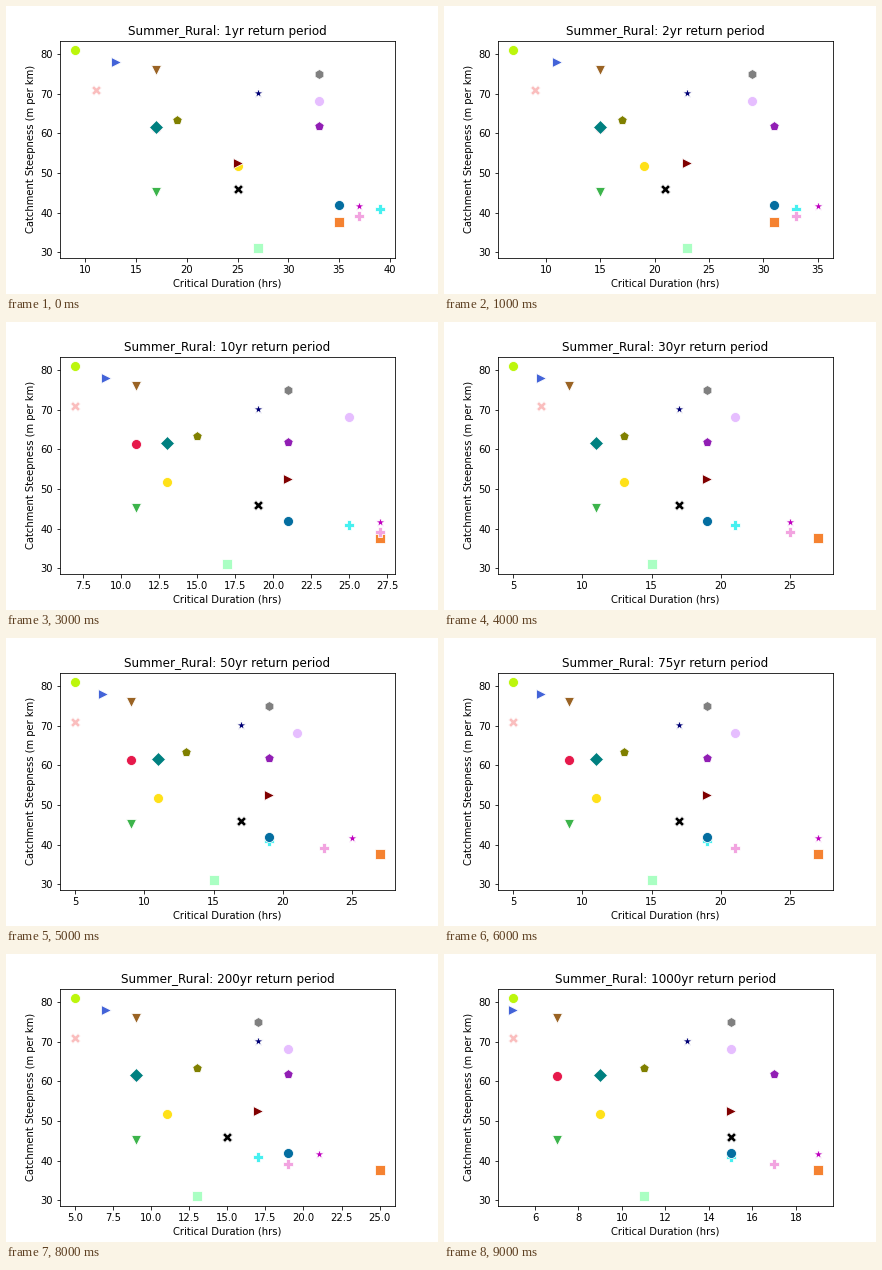
Animation, 432 px wide and 288 px high, one loop 10000 ms. Source, as a matplotlib script:

```python
import matplotlib.pyplot as plt
from matplotlib.animation import FuncAnimation

plt.rcParams["font.family"] = "DejaVu Sans"

# name: (colour, marker, steepness, duration for the 1yr period), in drawing order
SITES = {
    "crimson": ("#e6194b", "o", 61.3, 17),
    "green": ("#3cb44b", "v", 45.2, 17),
    "yellow": ("#ffe119", "o", 51.8, 25),
    "blue": ("#4363d8", ">", 77.9, 13),
    "orange": ("#f58231", "s", 37.6, 35),
    "purple": ("#911eb4", "p", 61.9, 33),
    "cyan": ("#46f0f0", "P", 40.9, 39),
    "pink": ("#f2a4e0", "P", 39.1, 37),
    "lime": ("#bcf60c", "o", 80.93, 9),
    "rose": ("#fabebe", "X", 70.9, 11),
    "teal": ("#008080", "D", 61.6, 17),
    "lavender": ("#e6beff", "o", 68.1, 33),
    "brown": ("#9a6324", "v", 76.0, 17),
    "maroon": ("#800000", ">", 52.6, 25),
    "mint": ("#aaffc3", "s", 31.03, 27),
    "olive": ("#808000", "p", 63.3, 19),
    "navy": ("#000075", "*", 70.3, 27),
    "gray": ("#808080", "h", 75.1, 33),
    "black": ("#000000", "X", 46.0, 25),
    "steel": ("#046ea0", "o", 41.8, 35),
    "magenta": ("#bf00bf", "*", 41.7, 37),
}

# return period: {change in duration: sites it applies to}
CHANGES = {
    1: {},
    2: {-2: "lime blue rose brown olive purple teal crimson maroon green magenta",
        -4: "navy gray lavender black mint steel pink orange",
        -6: "yellow cyan"},
    5: {-2: "blue rose brown olive teal crimson maroon black green mint steel orange",
        -4: "navy gray lavender purple yellow magenta pink",
        -6: "cyan"},
    10: {-2: "brown crimson yellow green cyan pink orange",
         -4: "gray mint magenta",
         -6: "purple",
         -8: "steel"},
    30: {-2: "lime blue brown navy gray olive purple teal maroon black mint "
             "steel magenta pink",
         -4: "lavender cyan"},
    50: {-2: "rose crimson yellow green cyan pink"},
    75: {-2: "pink", 2: "magenta"},
    100: {-2: "gray lavender maroon magenta orange"},
    200: {-2: "teal black mint cyan pink", -4: "magenta"},
    1000: {-2: "blue brown gray olive purple crimson maroon yellow green mint "
               "magenta cyan pink",
           -4: "navy lavender steel",
           -6: "orange"},
}
PERIODS = list(CHANGES)


def durations(index):
    hours = {name: site[3] for name, site in SITES.items()}
    for period in PERIODS[:index + 1]:
        for change, names in CHANGES[period].items():
            for name in names.split():
                hours[name] += change
    return hours


fig, ax = plt.subplots(figsize=(6, 4), dpi=72)
fig.subplots_adjust(left=0.125, right=0.9, bottom=0.125, top=0.88)


def draw(index):
    ax.clear()
    hours = durations(index)
    for name, (color, marker, steepness, _) in SITES.items():
        ax.scatter(hours[name], steepness, s=100, c=color, marker=marker,
                   edgecolors="white", linewidths=0.8)
    ax.set_title(f"Summer_Rural: {PERIODS[index]}yr return period")
    ax.set_xlabel("Critical Duration (hrs)")
    ax.set_ylabel("Catchment Steepness (m per km)")
    return []


anim = FuncAnimation(fig, draw, frames=len(PERIODS), init_func=lambda: draw(0),
                     interval=1000, repeat=True, repeat_delay=0)
plt.show()
```
